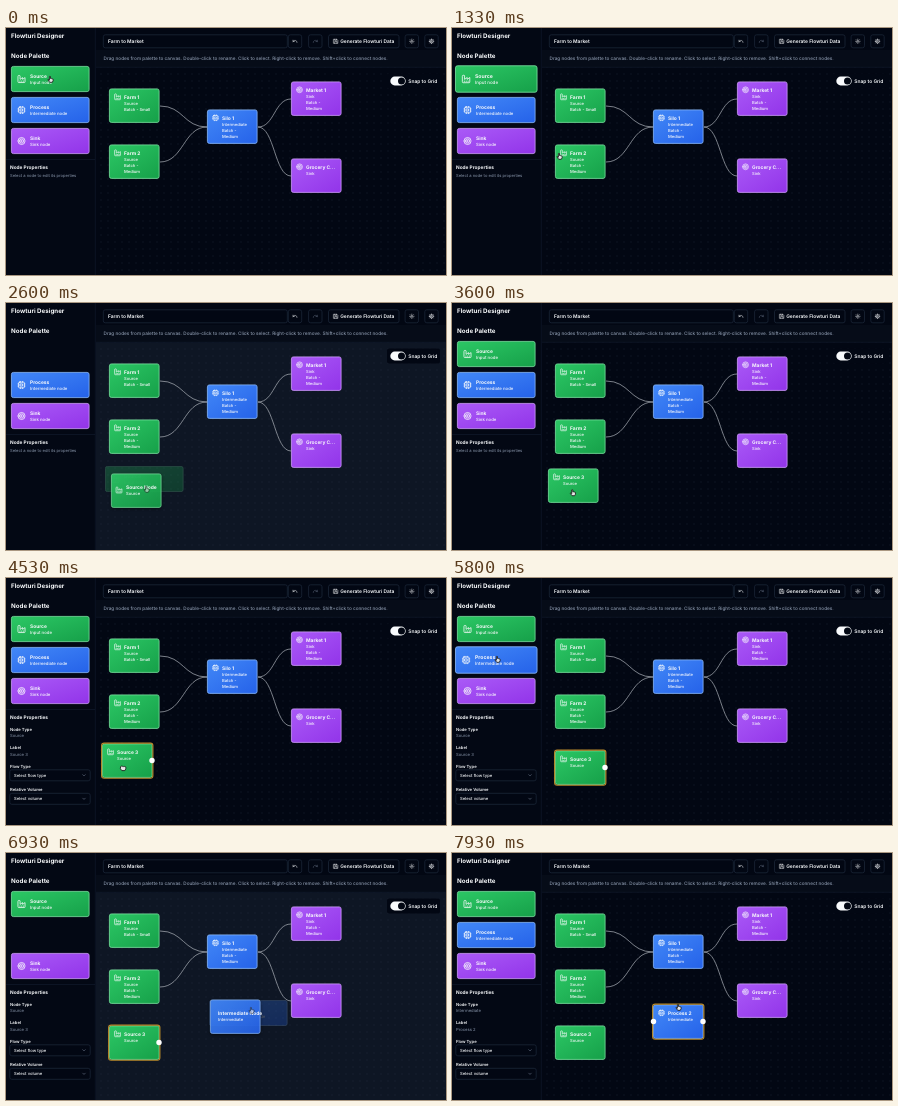
Recreate the animation shown at these times as an HTML page. Size 440x247 px, loop 8000 ms.

```html
<!DOCTYPE html>
<html lang="en">
<head>
<meta charset="utf-8">
<title>Flow designer</title>
<style>
  html, body { margin: 0; width: 100%; height: 100%; overflow: hidden; background: #020713; }
  svg { display: block; width: 100vw; height: 100vh; }
  text { font-family: Inter, Roboto, sans-serif; white-space: pre; text-rendering: geometricPrecision; }
</style>
</head>
<body>
<svg id="stage" viewBox="0 0 440 247">
  <defs>
    <pattern id="dots" x="98.5" y="49.5" width="7" height="7" patternUnits="userSpaceOnUse">
      <circle cx="3.5" cy="3.5" r=".45" fill="#2b364a"/>
    </pattern>
  </defs>
  <g id="scene"></g>
</svg>
<script>
const LOOP = 8000;
const MUTED = '#8b98ad', LINE = '#1b2638', WHITE = '#f8fafc', DARK = '#020713';
const NODE_W = 50.5, NODE_H = 34.3;

const KINDS = {
  source: { from: '#2cc765', to: '#16a049', edge: '#7ae2a0', icon: 'factory', title: 'Source', sub: 'Input node', y: 38 },
  process: { from: '#4288f7', to: '#2562e9', edge: '#8ab9fb', icon: 'cpu', title: 'Process', sub: 'Intermediate node', y: 69 },
  sink: { from: '#aa5af7', to: '#9234e9', edge: '#cf9efc', icon: 'target', title: 'Sink', sub: 'Sink node', y: 100 }
};

const rays = (inner, outer) => Array.from({ length: 8 }, (_, i) => {
  const c = Math.cos(i * Math.PI / 4), s = Math.sin(i * Math.PI / 4);
  return `M${12 + inner * c} ${12 + inner * s}L${12 + outer * c} ${12 + outer * s}`;
}).join('');
const ring = r => `M${12 - r} 12a${r} ${r} 0 1 0 ${2 * r} 0a${r} ${r} 0 1 0 ${-2 * r} 0`;

const ICONS = {
  factory: 'M2 20a2 2 0 0 0 2 2h16a2 2 0 0 0 2-2V8l-7 5V8l-7 5V4a2 2 0 0 0-2-2H4a2 2 0 0 0-2 2ZM7 18h1M12 18h1M17 18h1',
  cpu: 'M6 4h12a2 2 0 0 1 2 2v12a2 2 0 0 1-2 2H6a2 2 0 0 1-2-2V6a2 2 0 0 1 2-2ZM9 9h6v6H9ZM9 2v2M15 2v2M9 20v2M15 20v2M2 9h2M2 15h2M20 9h2M20 15h2',
  target: ring(10) + ring(6) + ring(2),
  gear: ring(8) + ring(3) + rays(8, 10.5),
  sun: ring(4) + rays(8, 10),
  undo: 'M3 7v6h6M21 17a9 9 0 0 0-15-6.7L3 13',
  redo: 'M21 7v6h-6M3 17a9 9 0 0 1 15-6.7L21 13',
  save: 'M3 3h14l4 4v14H3ZM7 3v5h8V3M7 21v-8h10v8',
  chevron: 'M6 9l6 6 6-6'
};

// Text is placed by the vertical centre of its capitals.
const text = (s, x, y, size, weight = 500, fill = WHITE) =>
  `<text x="${x}" y="${y + size * 0.36}" font-size="${size}" font-weight="${weight}" fill="${fill}">${s}</text>`;

const rect = (x, y, w, h, fill, stroke = 'none', r = 2, extra = '') =>
  `<rect x="${x}" y="${y}" width="${w}" height="${h}" rx="${r}" fill="${fill}" stroke="${stroke}" stroke-width=".8" ${extra}/>`;

const line = d => `<path d="${d}" stroke="#141e30" stroke-width=".6"/>`;

const icon = (name, cx, cy, size, color = WHITE) =>
  `<path transform="translate(${cx - size / 2} ${cy - size / 2}) scale(${size / 24})" d="${ICONS[name]}"
    fill="none" stroke="${color}" stroke-width="2.2" stroke-linecap="round" stroke-linejoin="round"/>`;

const box = (kind, x, y, w, h, extra = '') =>
  rect(x + .4, y + .4, w - .8, h - .8, `url(#${kind})`, KINDS[kind].edge, 2, extra);

document.querySelector('defs').innerHTML += Object.entries(KINDS).map(([id, k]) =>
  `<linearGradient id="${id}" x2="1" y2="1"><stop stop-color="${k.from}"/><stop offset="1" stop-color="${k.to}"/></linearGradient>`
).join('');

function paletteItem(kind, scale = 1, x = 5, y = KINDS[kind].y, opacity = 1) {
  const k = KINDS[kind];
  return `<g opacity="${opacity}" transform="translate(${x + 39} ${y + 13}) scale(${scale}) translate(-39 -13)">
    ${box(kind, 0, 0, 78.5, 26)}${icon(k.icon, 10.5, 13, 8.5)}
    ${text(k.title, 19, 10.2, 4.9, 700)}${text(k.sub, 19, 16.2, 4.3)}</g>`;
}

function node(kind, x, y, lines, selected = false) {
  let out = box(kind, x, y, NODE_W, NODE_H) + icon(KINDS[kind].icon, x + 8.5, y + 8.3, 7);
  const rows = [8.3, 14.7, 21, 26.7];
  lines.forEach((s, i) => out += text(s, x + 15, y + rows[i], i ? 4.15 : 4.9, i ? 500 : 700));
  if (selected) {
    out += rect(x - .4, y - .4, NODE_W + .8, NODE_H + .8, 'none', '#b98a2a', 2.5, 'style="stroke-width:1.1"');
    const ports = kind === 'process' ? [x + .5, x + NODE_W - .5] : [x + NODE_W - .5];
    ports.forEach(px => out += `<circle cx="${px}" cy="${y + 17}" r="2.7" fill="#fff"/>`);
  }
  return out;
}

function preview(kind, x, y) {
  const isSource = kind === 'source';
  const label = isSource ? 'Source' : 'Intermediate', tx = x + (isSource ? 15 : 8);
  return box(kind, x, y, NODE_W, NODE_H, 'opacity=".92" style="filter:drop-shadow(0 1px 1.5px #0008)"') +
    (isSource ? icon('factory', x + 8, y + 16.5, 7) : '') +
    text(label + ' Node', tx, y + 13.7, 4.9, 700) + text(label, tx, y + 20, 4.2);
}

const wire = (x1, y1, x2, y2) => {
  const mid = (x1 + x2) / 2;
  return `<path d="M${x1} ${y1}C${mid} ${y1} ${mid} ${y2} ${x2} ${y2}" fill="none" stroke="#a3a8b0" stroke-width=".75"/>`;
};

const select = (label, value, y) => text(label, 4, y, 4.2, 600) +
  rect(3.8, y + 3.8, 80.4, 11, DARK, LINE) + text(value, 8, y + 9.3, 4.2) + icon('chevron', 78, y + 9.3, 5, MUTED);

function properties(type, label) {
  const head = text('Node Properties', 4, 139, 4.8, 700);
  if (!type) return head + text('Select a node to edit its properties', 4, 147.7, 4.1, 400, MUTED);
  return head + text('Node Type', 4, 151.3, 4.2, 600) + text(type, 4, 157.7, 4.2, 400, MUTED) +
    text('Label', 4, 169.6, 4.2, 600) + text(label, 4, 176, 4.2, 400, MUTED) +
    select('Flow Type', 'Select flow type', 188) + select('Relative Volume', 'Select volume', 211.5);
}

const iconButton = (name, cx, color = WHITE) =>
  rect(cx - 6.7, 6.8, 13.4, 13, DARK, LINE) + icon(name, cx, 13.3, 5.4, color);

const toolbar = rect(90, 22, 350, 17, '#060c18', 'none', 0) +
  rect(97.3, 6.8, 184, 13, DARK, LINE) + text('Farm to Market', 102, 13.3, 4.9, 600) +
  iconButton('undo', 289) + iconButton('redo', 309.3, '#606b7e') +
  rect(322.5, 6.8, 70.5, 13, DARK, LINE) + icon('save', 329.8, 13.3, 5.4) +
  text('Generate Flowturi Data', 334.2, 13.3, 4.9, 600) +
  iconButton('sun', 405.8) + iconButton('gear', 425.5) +
  text('Drag nodes from palette to canvas. Double-click to rename. Click to select. Right-click to remove. Shift+click to connect nodes.',
    97.5, 30.3, 4.7, 500, MUTED) + line('M90 39.3H440');

const graph = wire(154, 78, 201, 99) + wire(154, 134, 201, 99) + wire(252, 99, 285, 71) + wire(252, 99, 285, 148) +
  node('source', 103, 60.5, ['Farm 1', 'Source', 'Batch - Small']) +
  node('source', 103, 116.5, ['Farm 2', 'Source', 'Batch -', 'Medium']) +
  node('process', 201, 81.5, ['Silo 1', 'Intermediate', 'Batch -', 'Medium']) +
  node('sink', 285, 53.5, ['Market 1', 'Sink', 'Batch -', 'Medium']) +
  node('sink', 285, 130.5, ['Grocery C...', 'Sink']);

const snapSwitch = rect(381, 45.5, 53, 15, DARK) + rect(384.3, 48.6, 15.4, 8.8, WHITE, 'none', 4.4) +
  `<circle cx="395.5" cy="53" r="3.5" fill="${DARK}"/>` + text('Snap to Grid', 402.3, 53, 4.9, 600);

// Pointer stops: time, x, y.
const PATH = [
  [0, 44, 51], [300, 44, 51], [1100, 107, 128], [1400, 107, 128], [1780, 44, 51], [1950, 44, 51],
  [2600, 140, 186], [2850, 134, 187], [3100, 134, 187], [3800, 117, 190], [4580, 117, 190], [4850, 124, 197],
  [5050, 124, 197], [5600, 45, 81], [6200, 45, 81], [6930, 245, 157], [7150, 242, 163], [7300, 242, 163],
  [7700, 226, 154], [8000, 226, 154]
];
const DRAGS = [
  { kind: 'source', start: 1950, end: 3000, hover: 70, ghost: [-41, -23], card: [-35, -15.5] },
  { kind: 'process', start: 6200, end: 7200, hover: 5530, ghost: [-42, -10], card: [-41, -10.5] }
];

const clamp = v => Math.max(0, Math.min(1, v));
const smooth = v => v * v * (3 - 2 * v);

function pointerAt(t) {
  const i = Math.max(1, PATH.findIndex(p => p[0] > t));
  const [t0, x0, y0] = PATH[i - 1], [t1, x1, y1] = PATH[i];
  const k = smooth(clamp((t - t0) / (t1 - t0)));
  return [x0 + (x1 - x0) * k, y0 + (y1 - y0) * k];
}

const FIST = 'M-2.4-1.4q1-1 1.5 0q.7-.9 1.4 0q.8-.7 1.4.2q.9-.3.9.6v1.4l-1 1.8h-3l-1.4-1.9Z';
const POINTING = 'M-.6-2.5q.6-.6 1.1 0v2q.6-.4 1 .1q.6-.3.9.2q.8-.1.7.7v1.3l-.8 1.5h-2.6l-1.8-2.5q.2-.8 1 0l.5.5Z';
const hand = (x, y, shape, opacity) =>
  `<path transform="translate(${x} ${y})" d="${shape}" opacity="${opacity}" fill="#e8e8e8" stroke="#111" stroke-width=".8" stroke-linejoin="round"/>`;

function draw(t) {
  const [px, py] = pointerAt(t);
  const drag = DRAGS.find(d => t >= d.start && t < d.end);
  const overCanvas = drag && px > 95;
  const picked = t >= 7500 ? 'process' : t >= 3850 ? 'source' : '';

  let out = rect(90, 39.5, 350, 208, overCanvas ? '#0e1624' : DARK, 'none', 0) +
    rect(90, 39.5, 350, 208, 'url(#dots)', 'none', 0) + toolbar + graph + snapSwitch;

  if (t >= 3000) {
    const shift = t >= 4720 ? 7 : 0;
    out += node('source', 96 + shift, 165.5 + shift, ['Source 3', 'Source'], picked === 'source');
  }
  if (t >= 7200) out += node('process', 201, 151.5, ['Process 2', 'Intermediate'], picked === 'process');

  out += rect(0, 0, 89, 247, '#030814', 'none', 0) + line('M89.3 0V247M0 131.5H89') +
    text('Flowturi Designer', 5, 8, 6.2, 700) + text('Node Palette', 5, 28, 6.2, 700) +
    properties(...{ '': [], source: ['Source', 'Source 3'], process: ['Intermediate', 'Process 2'] }[picked]);

  for (const kind in KINDS) {
    if (drag && drag.kind === kind) continue;
    const d = DRAGS.find(item => item.kind === kind);
    const grow = d && t < d.start ? smooth(clamp((t - d.hover) / 200)) : 0;
    out += paletteItem(kind, 1 + .05 * grow);
  }

  if (drag) {
    out += paletteItem(drag.kind, 1, px + drag.ghost[0], py + drag.ghost[1], .27);
    if (overCanvas) out += preview(drag.kind, px + drag.card[0], py + drag.card[1]);
  }
  const gripping = t > 4300 && t < 5000;
  document.getElementById('scene').innerHTML = out + hand(px, py, gripping ? FIST : POINTING, drag ? .6 : 1);
}

function tick() {
  draw(performance.now() % LOOP);
  requestAnimationFrame(tick);
}
tick();
</script>
</body>
</html>
```
